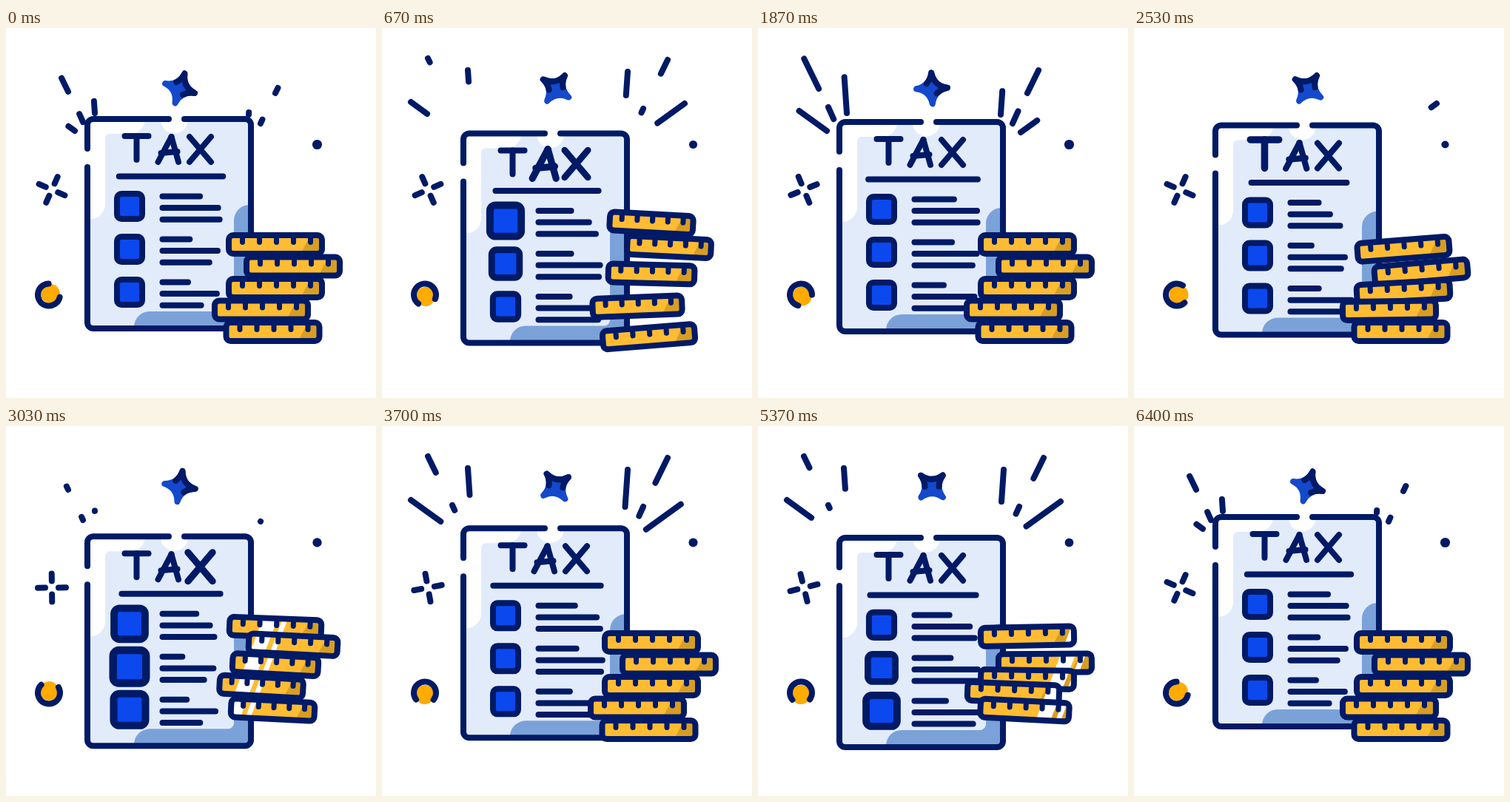
Write an HTML page with a canvas that moves like this. It is 500 px wide and 500 px high and loops after 6430 ms.

```html
<!DOCTYPE html>
<html lang="en">
<head>
<meta charset="utf-8">
<title>Tax sheet</title>
<style>
  html, body { margin: 0; width: 100%; height: 100%; overflow: hidden; background: #fff; }
  canvas { display: block; width: 100vw; height: 100vh; }
</style>
</head>
<body>
<canvas id="stage" width="500" height="500"></canvas>
<script>
const ctx = document.getElementById('stage').getContext('2d');
const LOOP = 6430, SPAN = 6400;
const BEAT = SPAN / 3;   // sheet, coins, boxes, letters
const SWAY = SPAN / 4;   // ornaments, lines, rays
const NAVY = '#001a66', BLUE = '#0b49ee', STAR = '#1549cc', PAPER = '#e2ebfa',
      SHADE = '#7ba2d8', GOLD = '#ffbc33', BRONZE = '#d89e22', ORANGE = '#ffab00';

const mod = (a, n) => ((a % n) + n) % n;
const clamp = v => Math.max(0, Math.min(1, v));
const rad = deg => deg * Math.PI / 180;
const wave = (t, mid, amp, peak) => mid + amp * Math.cos(2 * Math.PI * (t - peak) / SWAY);

// soft pulse, 0 to 1 to 0
function bump(t, peak, half) {
  const d = (t - peak) / half;
  return Math.abs(d) < 1 ? Math.cos(d * Math.PI / 2) ** 2 : 0;
}

// flight arc that leaves and lands at speed
function hop(t, from, to) {
  const d = Math.abs(2 * (t - from) / (to - from) - 1);
  return d < 1 ? 1 - d ** 2.5 : 0;
}

function stroke(width = 8, color = NAVY) {
  ctx.lineWidth = width;
  ctx.strokeStyle = color;
  ctx.stroke();
}

function fill(color) {
  ctx.fillStyle = color;
  ctx.fill();
}

function line(x0, y0, x1, y1, width = 8) {
  ctx.beginPath();
  ctx.moveTo(x0, y0);
  ctx.lineTo(x1 + 0.01, y1);
  stroke(width);
}

function slant(low, top, width, y0, y1, color) {
  ctx.beginPath();
  ctx.moveTo(top, y0);
  ctx.lineTo(top + width, y0);
  ctx.lineTo(low + width, y1);
  ctx.lineTo(low, y1);
  fill(color);
}

function disc(x, y, r, color) {
  ctx.beginPath();
  ctx.arc(x, y, r, 0, 2 * Math.PI);
  fill(color);
}

function placed(x, y, deg, scale, draw) {
  ctx.save();
  ctx.translate(x, y);
  ctx.rotate(rad(deg));
  ctx.scale(scale, scale);
  draw();
  ctx.restore();
}

// left side rays in order of launch: distance from the middle, start y, dx, dy
const MIDDLE = 224;
const RAYS = [[120, 128, 9, -20], [140, 87, 22, -45], [104, 116, 4, -58], [131, 140, 54, -39]];

function drawRays(t) {
  const s = mod(t - 1300, SWAY);
  const grow = u => clamp(u / 520) ** 1.2;
  for (const side of [-1, 1]) {
    RAYS.forEach(([x, y, dx, dy], i) => {
      const u = s - 66 * i + 10 - (side > 0 ? 135 : 0);
      const head = grow(u), tail = grow(u - 447);
      if (head === 0 || tail === 1) return;
      const at = k => [MIDDLE + side * (x + dx * k), y + side + dy * k];
      line(...at(tail), ...at(head));
    });
  }
}

function drawCross(t) {
  placed(62, 218.5, wave(t, 35, 45, 465), 1, () => {
    for (let i = 0; i < 4; i++) {
      ctx.rotate(Math.PI / 2);
      line(9, 0, 19, 0);
    }
  });
}

function drawRing(t) {
  placed(58, 360.5, wave(t, 0, 91, 515), 1, () => {
    disc(2.5, 0, 13, ORANGE);
    ctx.beginPath();
    ctx.arc(0, 0, 15, rad(52), rad(308));
    stroke();
  });
}

function drawStar(t) {
  placed(235, 81.5, wave(t, -21, 39, 0), 1, () => {
    const tip = 21, dip = 3;
    const side = i => {
      const a = i * Math.PI / 2, c = Math.cos(a), s = Math.sin(a);
      ctx.quadraticCurveTo(dip * (c + s), dip * (s - c), tip * c, tip * s);
    };
    ctx.beginPath();
    ctx.moveTo(-tip, 0);
    for (let i = 3; i < 7; i++) side(i);
    ctx.closePath();
    fill(STAR);
    stroke(8, STAR);
    ctx.beginPath();
    ctx.moveTo(-7, -6.5);
    ctx.quadraticCurveTo(-1.5, -12, 0, -tip);
    side(4);
    ctx.quadraticCurveTo(12, 1.5, 6.5, 7);
    stroke();
  });
}

function drawSheet() {
  ctx.save();
  ctx.beginPath();
  ctx.roundRect(110, 123, 221, 283, 8);
  fill(PAPER);
  ctx.clip();

  // highlight in the upper left corner
  ctx.beginPath();
  ctx.moveTo(105, 118);
  ctx.lineTo(188, 118);
  ctx.arcTo(188, 143, 160, 143, 20);
  ctx.arcTo(134, 143, 134, 200, 6);
  ctx.arcTo(134, 258, 105, 258, 20);
  ctx.lineTo(105, 258);
  fill('#fff');
  disc(227.5, 124, 18.5, '#fff');

  // shade along the lower right edge
  ctx.beginPath();
  ctx.moveTo(331, 239);
  ctx.arcTo(308, 239, 308, 300, 21);
  ctx.arcTo(308, 383, 250, 383, 8);
  ctx.arcTo(173, 383, 173, 410, 21);
  ctx.lineTo(173, 406);
  ctx.lineTo(331, 406);
  fill(SHADE);
  ctx.restore();

  ctx.beginPath();
  ctx.moveTo(241, 123);
  ctx.arcTo(331, 123, 331, 406, 8);
  ctx.arcTo(331, 406, 110, 406, 8);
  ctx.arcTo(110, 406, 110, 123, 8);
  ctx.lineTo(110, 188);
  ctx.moveTo(110, 163);
  ctx.arcTo(110, 123, 221, 123, 8);
  ctx.lineTo(220, 123);
  stroke();
}

// strokes of T, A and X around their centers
const LETTERS = [
  [[-16, -18, 16, -18], [0, -18, 0, 14]],
  [[-14, 17, 4, -17], [4, -17, 13.5, 17], [-10, 5, 12, 3]],
  [[-14.5, -17, 14.5, 17], [14.5, -17, -14.5, 17]]
];

function drawTitle(t, beat) {
  LETTERS.forEach((parts, i) => {
    const size = 1 + 0.2 * bump(beat, 390 + 210 * i, 250);
    placed(176.5 + 43 * i, 164, 0, size, () => parts.forEach(p => line(...p)));
  });
  const half = wave(t, 68.5, 5.5, 320);
  line(223 - half, 200.5, 223 + half, 200.5);
}

// middle length and swing of each text line
const ROWS = [[46, 8], [68, 17], [75, 11], [37, 16], [77, 10], [70, 15], [38, 5], [80, 8], [66, 15]];

function drawList(t, beat) {
  ROWS.forEach(([length, swing], i) => {
    const y = 227.5 + Math.floor(i / 3) * 58 + (i % 3) * 15.6;
    line(211.5, y, 211 + wave(t, length, swing, 225 + 57 * i), y);
  });
  for (let i = 0; i < 3; i++) {
    const size = 1 + 0.31 * bump(beat - i * 103, 780, 350);
    placed(167, 241 + i * 58, 0, size, () => {
      ctx.beginPath();
      ctx.roundRect(-17, -17, 34, 34, 6);
      fill(BLUE);
      stroke();
    });
  }
}

const COINS = [364, 388, 364, 345, 360.5];
const GLINTS = [840, 2683, 4800, 5600];

function drawGlint(t) {
  for (const start of GLINTS) {
    const x = 230 + (t - start) * 0.36;
    if (x < 230 || x > 560) continue;
    for (const [shift, width] of [[-20, 20], [7, 7]]) {
      slant(x + shift - 60, x + shift + 27, width, 220, 450, '#fff');
    }
  }
}

function drawCoin(t, u, x, y) {
  const lift = 8 * bump(u, 340, 190) - 29 * hop(u, 430, 1005) - 9 * bump(u, 1125, 125);
  const tilt = -5 * bump(u, 350, 220) + 3.2 * hop(u, 450, 1000) - 1.2 * bump(u, 1110, 130);
  const squeeze = 1 - 0.1 * bump(u, 650, 330);
  const half = 67 * squeeze - 4;
  const edge = () => {
    ctx.beginPath();
    ctx.roundRect(-half, -12.5, 2 * half, 25, 6);
  };

  placed(x, y + lift, tilt, 1, () => {
    edge();
    fill(GOLD);
    ctx.save();
    ctx.clip();
    slant(34 * squeeze, 48 * squeeze, 60, -13, 13, BRONZE);
    ctx.setTransform(1, 0, 0, 1, 0, 0);
    drawGlint(t);
    ctx.restore();
    for (let k = -2; k < 3; k++) {
      const tick = (1.5 + 23 * k) * squeeze;
      line(tick, -11, tick, -3, 7);
    }
    edge();
    stroke();
  });
}

function draw(t) {
  const beat = mod(t, BEAT);
  ctx.setTransform(1, 0, 0, 1, 0, 0);
  ctx.fillStyle = '#fff';
  ctx.fillRect(0, 0, 500, 500);
  ctx.lineCap = ctx.lineJoin = 'round';

  drawRays(t);
  drawCross(t);
  drawRing(t);
  drawStar(t);
  disc(420.5, 157.5, wave(t, 5.9, 0.8, 150), NAVY);

  ctx.save();
  ctx.translate(0, 14 - 14 * Math.cos(2 * Math.PI * t / BEAT));
  drawSheet();
  drawTitle(t, beat);
  drawList(t, beat);
  ctx.restore();

  COINS.forEach((x, i) => drawCoin(t, beat - i * 70, x, 292.5 + 29.5 * i));
}

const begin = performance.now();
function tick() {
  draw(Math.min((performance.now() - begin) % LOOP, SPAN));
  requestAnimationFrame(tick);
}
tick();
</script>
</body>
</html>
```
